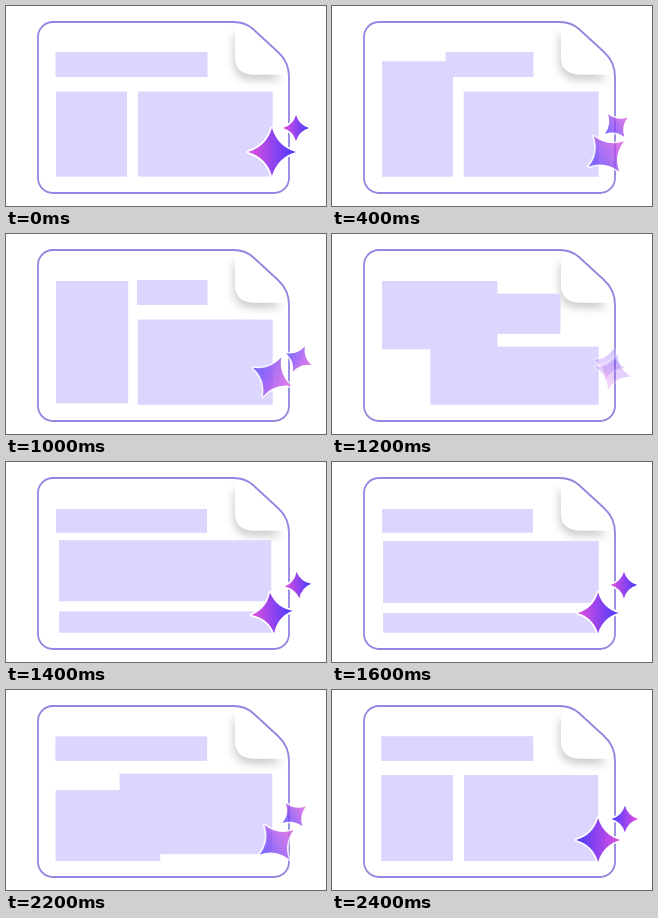
An HTML page with a canvas for the animation above (2700 ms loop, 320 px wide and 200 px high).

```html
<!DOCTYPE html>
<html lang="en">
<head>
<meta charset="utf-8">
<title>Layout suggestions</title>
<style>
  html, body { margin: 0; width: 100%; height: 100%; overflow: hidden; background: #fff; }
  canvas { display: block; width: 320px; height: 200px; }
</style>
</head>
<body>
<canvas id="stage"></canvas>
<script>
const canvas = document.getElementById('stage');
const ctx = canvas.getContext('2d');
const scale = window.devicePixelRatio || 1;
canvas.width = 320 * scale;
canvas.height = 200 * scale;

const LOOP = 2700, LAST = 2400, STEP = 100, PHASE = 900, MOVE = 430;

// Blocks as [left, top, right, bottom], in the same order in every layout.
const layouts = [
  [[49.5, 46, 201.5, 71], [50, 85.5, 121, 170.6], [132, 85.5, 266.7, 170.6]],
  [[131, 46, 201.5, 71], [50, 47, 121, 170.8], [131.7, 85.5, 266.7, 170.8]],
  [[51, 79, 266.8, 141], [50, 47, 201, 70.8], [51, 151, 266.8, 170.8]],
  [[132, 85, 266.2, 171], [49.2, 46.2, 201.2, 71], [49.2, 85, 121, 171]]
];

// Star pair at rest: centre x, y, distance, axis in degrees, big and small radius
const rests = [
  [278, 134, 34, -45, 24, 13],
  [279.5, 134.5, 31.4, -53, 22.5, 13],
  [279, 137, 38, -47, 20.5, 13.3],
  [279.5, 139.5, 34, -38, 22, 13.3]
];

const clamp = x => Math.min(1, Math.max(0, x));
const ease = x => x * x * (3 - 2 * x);
const mix = (a, b, k) => a.map((v, i) => v + (b[i] - v) * k);
const rad = deg => deg * Math.PI / 180;

function pagePath() {
  ctx.beginPath();
  ctx.moveTo(47, 16);
  ctx.lineTo(228, 16);
  ctx.quadraticCurveTo(239, 16, 247, 23);
  ctx.lineTo(272, 46);
  ctx.quadraticCurveTo(283, 56, 283, 71);
  ctx.arcTo(283, 187, 268, 187, 15);
  ctx.arcTo(32, 187, 32, 172, 15);
  ctx.arcTo(32, 16, 47, 16, 15);
  ctx.closePath();
}

function foldPath(top, right) {
  ctx.beginPath();
  ctx.moveTo(229, top);
  ctx.lineTo(229, 50);
  ctx.quadraticCurveTo(229, 68.5, 248, 68.5);
  ctx.lineTo(right, 68.5);
}

function drawFold() {
  ctx.save();
  pagePath();
  ctx.clip();
  ctx.fillStyle = '#fff';
  ctx.save();
  ctx.shadowColor = 'rgba(0,0,0,.22)';
  ctx.shadowBlur = 10 * scale;
  ctx.shadowOffsetX = -scale;
  ctx.shadowOffsetY = 5 * scale;
  foldPath(21, 277);
  ctx.fill();
  ctx.restore();
  // Clean face of the folded corner
  foldPath(16, 284);
  ctx.lineTo(284, 16);
  ctx.fill();
  ctx.restore();
}

function drawBlocks(phase, local) {
  ctx.fillStyle = '#dcd6ff';
  layouts[phase].forEach((from, i) => {
    const delay = phase === 1 && i === 1 ? 69 : 98 + (phase === 1 ? 12 : phase * 2.5);
    const k = ease(clamp((local - delay) / MOVE));
    const [l, top, r, b] = mix(from, layouts[phase + 1][i], k);
    ctx.fillRect(l, top, r - l, b - top);
  });
}

function drawStar(x, y, r, turn, alpha) {
  const c = r * .23;
  ctx.save();
  ctx.translate(x, y);
  ctx.rotate(rad(turn));
  ctx.globalAlpha = alpha;
  ctx.beginPath();
  ctx.moveTo(r, 0);
  ctx.quadraticCurveTo(c, c, 0, r);
  ctx.quadraticCurveTo(-c, c, -r, 0);
  ctx.quadraticCurveTo(-c, -c, 0, -r);
  ctx.quadraticCurveTo(c, -c, r, 0);
  ctx.closePath();
  ctx.lineJoin = 'round';
  ctx.lineWidth = 3.4;
  ctx.strokeStyle = '#fff';
  ctx.stroke();
  const g = ctx.createLinearGradient(-r, 0, r, 0);
  g.addColorStop(0, '#e250dc');
  g.addColorStop(.5, '#9444ee');
  g.addColorStop(1, '#473cff');
  ctx.fillStyle = g;
  ctx.fill();
  ctx.restore();
}

// The pair makes half a turn per phase, trading places and sizes while it fades.
function drawStars(phase, local) {
  const k = ease(clamp(local / 500));
  const spin = clamp(local / 530);
  const turn = 180 * (phase + (spin + ease(spin)) / 2);
  const alpha = clamp(Math.abs(local - 250) / 200);
  const [cx, cy, dist, axis, big, small] = mix(rests[phase], rests[phase + 1], k);
  const pinch = Math.exp(-(((local - 285) / 70) ** 2));
  const half = dist / 2 * (1 - .8 * pinch);
  const y = cy - 3 * (1 - alpha);
  const angle = rad(axis + 180 * k);
  const dx = Math.cos(angle) * half, dy = Math.sin(angle) * half;
  const swap = (small - big) * k;
  drawStar(cx - dx, y - dy, big + swap, turn, alpha);
  drawStar(cx + dx, y + dy, small - swap, turn, alpha);
}

function draw(t) {
  const phase = Math.min(2, Math.floor(t / PHASE));
  const local = t - phase * PHASE;
  ctx.setTransform(scale, 0, 0, scale, 0, 0);
  ctx.fillStyle = '#fff';
  ctx.fillRect(0, 0, 320, 200);
  drawFold();
  drawBlocks(phase, local);
  pagePath();
  ctx.lineWidth = 1.8;
  ctx.strokeStyle = '#9186e0';
  ctx.stroke();
  drawStars(phase, local);
}

let start;
function tick(now) {
  if (start === undefined) start = now;
  const t = Math.max(0, now - start) % LOOP;
  draw(Math.min(LAST, Math.floor(t / STEP) * STEP));
  requestAnimationFrame(tick);
}
draw(0);
requestAnimationFrame(tick);
</script>
</body>
</html>
```
